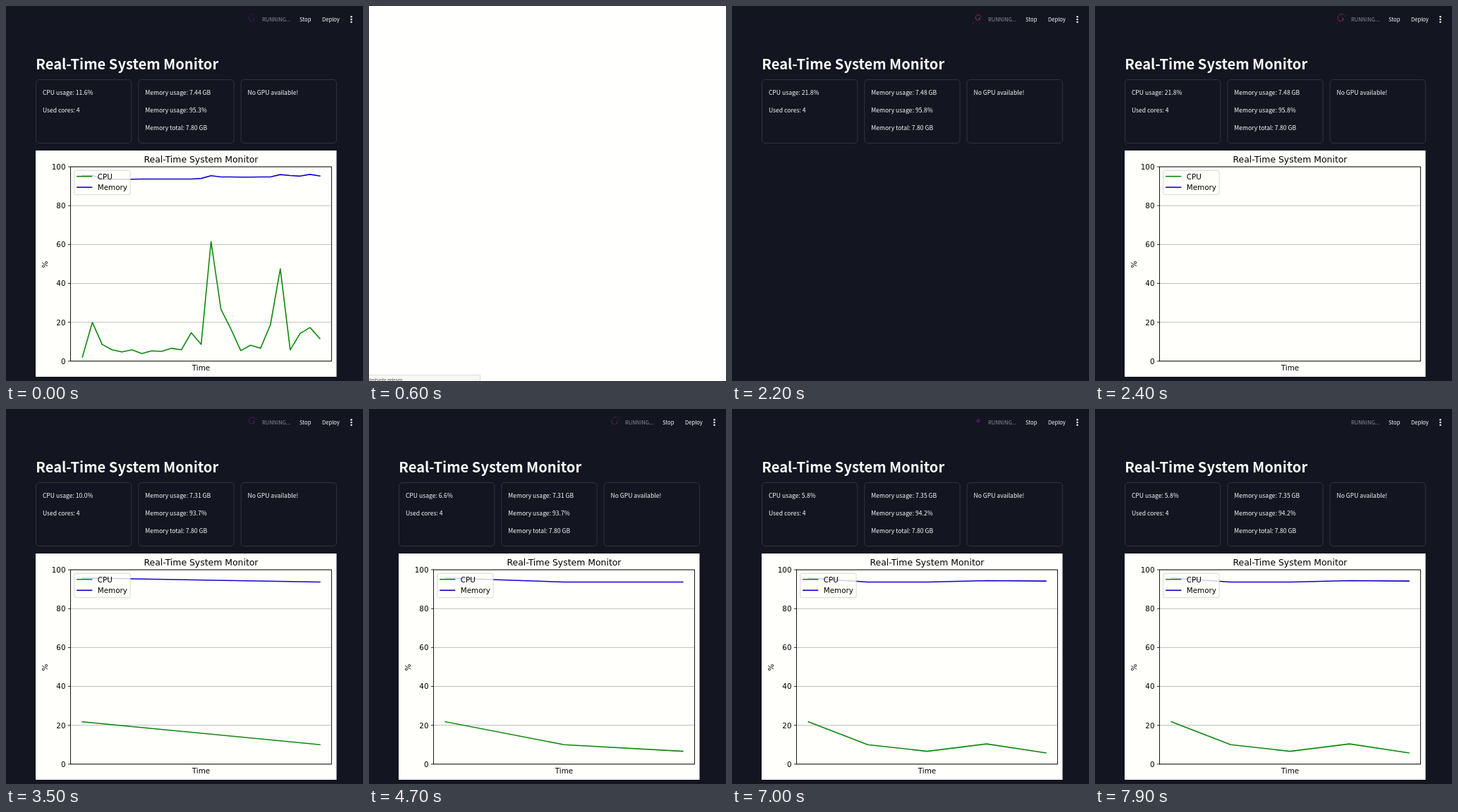
Recreate the animation shown at these times as an HTML page. Size 506 by 532 pixels, loop 8000 ms.

```html
<!DOCTYPE html>
<html lang="en">
<head>
<meta charset="utf-8">
<title>System monitor</title>
<style>
  html, body { margin: 0; width: 100%; height: 100%; overflow: hidden; background: #131620; }
  svg { display: block; width: 506px; height: 532px; }
  .ui { font-family: "Noto Sans CJK JP", "Noto Sans CJK SC", "Noto Sans CJK", "Open Sans", sans-serif; fill: #fafafa; }
  .plot { font: 10.36px "DejaVu Sans", sans-serif; fill: #000; }
  .line { fill: none; stroke-width: 1.6; stroke-linejoin: round; stroke-linecap: square; }
  .cpu { stroke: #0d8a0d; }
  .mem { stroke: #1200d6; }
</style>
</head>
<body>
<svg id="stage" viewBox="0 0 506 532"></svg>
<script>
const LOOP = 8000;
const stage = document.getElementById('stage');

const oldCpu = [2.1, 19.9, 8.6, 5.8, 4.7, 5.8, 3.9, 5.3, 5, 6.6, 5.8, 14.6, 8.6, 61.5, 26.7,
  16.6, 5.4, 8.2, 6.6, 18.7, 47.5, 5.8, 14.2, 17.3, 11.6];
const oldMem = [95.6, 95.6, 93.7, 93.6, 93.5, 93.6, 93.7, 93.7, 93.7, 93.7, 93.7, 93.7, 94, 95.4,
  94.8, 94.8, 94.7, 94.7, 94.8, 94.8, 96, 95.5, 95.2, 96.1, 95.3];
const newCpu = [21.8, 10, 6.6, 10.4, 5.8];
const newMem = [95.8, 93.7, 93.7, 94.4, 94.2];
const newGb = ['7.48', '7.31', '7.31', '7.37', '7.35'];
const cardTimes = [2200, 3300, 4500, 5700, 6900];
const chartTimes = [2400, 3400, 4600, 5800, 7000];

// Fireworks of the busy icon: start, duration, colour
const bursts = [
  [-350, 700, '#4b1670'], [1400, 650, '#8a2468'], [1900, 950, '#c02468'],
  [3000, 1100, '#6a1c80'], [4150, 850, '#8a2468'], [5200, 1050, '#a02c48'],
  [6900, 800, '#6a1c80']
];

const passed = (times, t) => times.filter(s => t >= s).length;

const text = (x, y, s, size, extra = '') =>
  `<text x="${x}" y="${y}" font-size="${size}" ${extra}>${s}</text>`;

function icon(t) {
  let out = '';
  for (const [start, span, color] of bursts) {
    const p = (t - start) / span;
    if (p <= 0 || p >= 1) continue;
    const reach = 1 - (1 - p) ** 3;
    for (let i = 0; i < 18; i++) {
      const a = i * 2.4, r = 7.5 * reach * (0.35 + 0.65 * ((i * 7 % 18) / 18));
      out += `<circle cx="${349 + r * Math.cos(a)}" cy="${17 + r * Math.sin(a) + 2 * p * p}" r=".6"
        fill="${color}" opacity="${Math.min(1, 2.2 * (1 - p))}"/>`;
    }
    out += `<path d="M341 25l${4 * reach} ${-4 * reach}" stroke="${color}" stroke-dasharray="1 1.5"
      opacity="${1 - p}"/>`;
  }
  return out;
}

function header(t, running) {
  let out = text(448, 22, 'Deploy', 7.6);
  for (const y of [15.3, 19, 22.7]) out += `<circle cx="489.5" cy="${y}" r="1.25"/>`;
  if (running) out += text(363, 22, 'RUNNING...', 7.5, 'fill="#8c8e97"') + text(416, 22, 'Stop', 7.6) + icon(t);
  return out;
}

function cards(cpu, gb, mem) {
  const columns = [
    [`CPU usage: ${cpu.toFixed(1)}%`, 'Used cores: 4'],
    [`Memory usage: ${gb} GB`, `Memory usage: ${mem.toFixed(1)}%`, 'Memory total: 7.80 GB'],
    ['No GPU available!']
  ];
  return columns.map((rows, c) => {
    const x = 42.5 + c * 145.3;
    return `<rect x="${x}" y="104.5" width="135.3" height="90" rx="4.5" fill="none" stroke="#393b46" stroke-width=".8"/>` +
      rows.map((s, r) => text(x + 9.4, 125.5 + r * 25.2, s, 8.6)).join('');
  }).join('');
}

const yOf = v => 503.8 - v * 2.757;

function curve(values, name) {
  if (values.length < 2) return '';
  const step = 336.6 / (values.length - 1);
  const points = values.map((v, i) => `${108.3 + i * step},${yOf(v)}`).join(' ');
  return `<polyline class="line ${name}" points="${points}"/>`;
}

function chart(cpu, mem) {
  let out = '<rect x="42" y="205" width="426.5" height="321" fill="#fffffb"/>';
  for (let v = 0; v <= 100; v += 20) {
    const y = yOf(v);
    out += `<path d="M91.5 ${y}H461.5" stroke="#b0b0b0" stroke-width=".83"/>
      <path d="M87.9 ${y}h3.6" stroke="#000" stroke-width=".83"/>` +
      text(84.5, y + 3.9, v, 10.36, 'text-anchor="end"');
  }
  out += curve(cpu, 'cpu') + curve(mem, 'mem');
  out += '<rect x="91.5" y="228.1" width="370" height="275.7" fill="none" stroke="#000" stroke-width=".9"/>';
  out += '<rect x="96.7" y="233.3" width="79.4" height="34.4" rx="2" fill="#fffffb" fill-opacity=".8" stroke="#ccc" stroke-opacity=".8"/>';
  [['CPU', 'cpu'], ['Memory', 'mem']].forEach(([label, name], i) => {
    const y = 241.7 + i * 15.5;
    out += `<path class="line ${name}" d="M100.9 ${y}h20.6"/>` + text(129.8, y + 4.2, label, 10.36);
  });
  const mid = 'text-anchor="middle"';
  out += text(276.5, 221.7, 'Real-Time System Monitor', 12.43, mid) + text(276.5, 516.8, 'Time', 10.36, mid);
  out += text(0, 0, '%', 10.36, mid + ' transform="translate(58.5 366.5) rotate(-90)"');
  return `<g class="plot">${out}</g>`;
}

function page(t) {
  const before = t < 400;
  const running = before || t >= 1400;
  let out = '<rect width="506" height="532" fill="#131620"/>';
  if (before || t >= 1200) out += header(t, running);
  if (running) out += text(42.3, 89.5, 'Real-Time System Monitor', 20.1, 'font-weight="700"');
  if (before) return out + cards(11.6, '7.44', 95.3) + chart(oldCpu, oldMem);
  const n = passed(cardTimes, t), m = passed(chartTimes, t);
  if (n) out += cards(newCpu[n - 1], newGb[n - 1], newMem[n - 1]);
  if (m) out += chart(newCpu.slice(0, m), newMem.slice(0, m));
  return out;
}

function loading() {
  return `<rect width="506" height="532" fill="#fffffd"/>
    <rect x="-2" y="523.8" width="159.7" height="12" fill="#f7f7f5" stroke="#d4d4d2" stroke-width=".8"/>` +
    text(0.5, 532.8, 'testseite gelesen', 6.1, 'style="fill:#444"');
}

function draw(now) {
  const t = now % LOOP;
  stage.innerHTML = `<g class="ui">${t >= 400 && t < 1000 ? loading() : page(t)}</g>`;
  requestAnimationFrame(draw);
}
requestAnimationFrame(draw);
</script>
</body>
</html>
```
